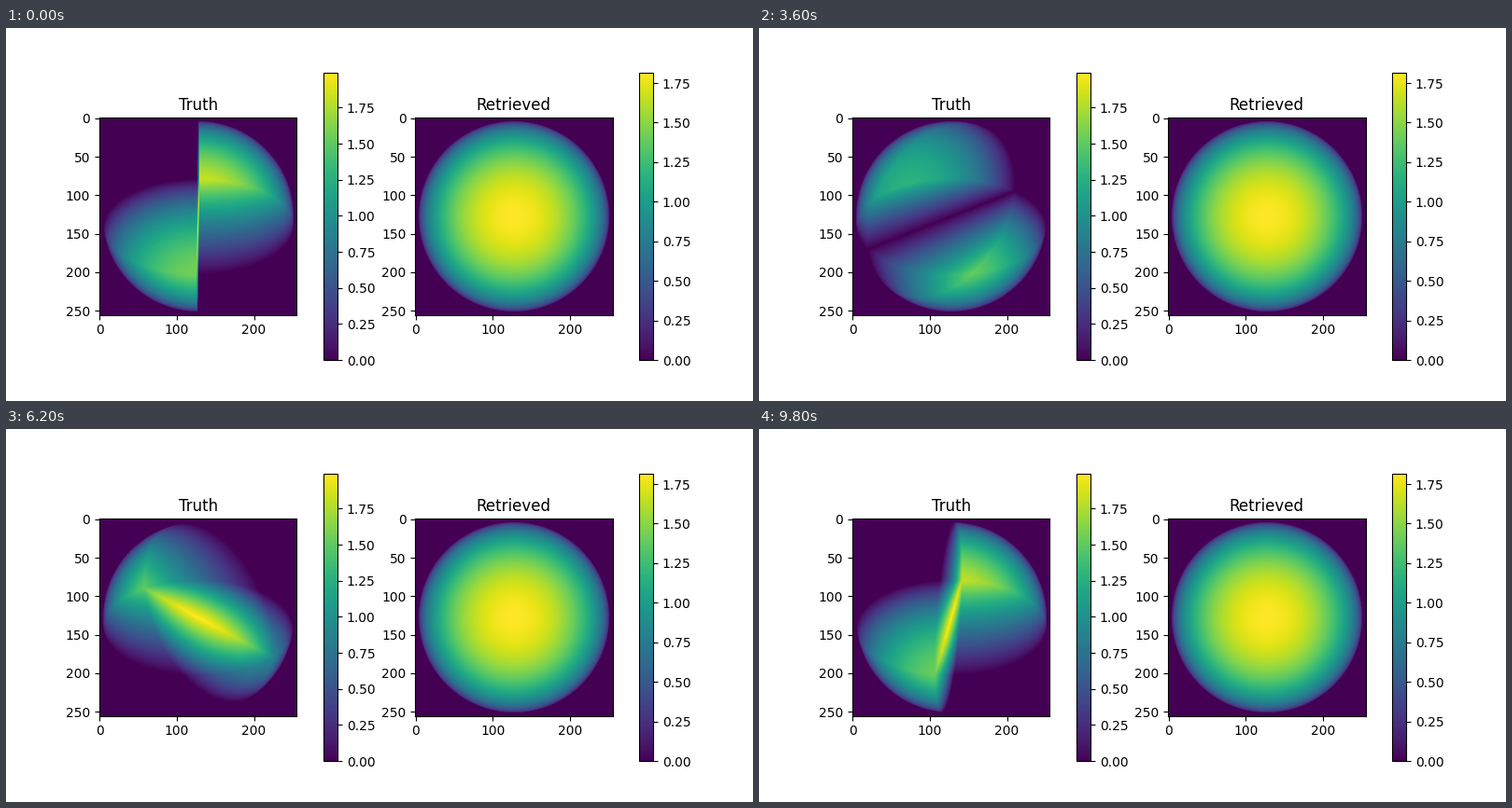
Animation, 800 px wide and 400 px high, one loop 10 s. Source, as a matplotlib script:

```python
import numpy as np
import matplotlib.pyplot as plt
from matplotlib.animation import FuncAnimation

SIZE = 256
FRAMES = 50
DIST = 4.0                      # camera distance in ball radii
TILT = np.radians(29.5)         # camera elevation
FOV = np.radians(30)
OFFSET = np.radians(0.8)        # starting angle of the cut plane
TRUTH_MAX, FIT_MAX = 1.992, 1.815

# Pinhole rays: u to the right, v towards the camera, z up.
s, c = np.sin(TILT), np.cos(TILT)
axis = (np.arange(SIZE) - (SIZE - 1) / 2) / (SIZE / 2) * np.tan(FOV / 2)
px, py = np.meshgrid(axis, -axis)
norm = np.sqrt(1 + px**2 + py**2)
du, dv, dz = px / norm, (-c - s * py) / norm, (-s + c * py) / norm
cam_v, cam_z = DIST * c, DIST * s

# Entry and exit distances through the unit ball.
mid = -(cam_v * dv + cam_z * dz)
half = np.sqrt(np.clip(1 - DIST**2 + mid**2, 0, None))
enter, leave = mid - half, mid + half


def crossing(pos, step):
    """Distance to a plane, kept inside the ball."""
    step = np.where(np.abs(step) < 1e-9, 1e-9, step)
    return np.clip(-pos / step, enter, leave)


def truth(i):
    """Path length through two opposite quarter balls."""
    t = 2 * np.pi * i / FRAMES - OFFSET
    cam_y = -cam_v * np.sin(t)
    dy = du * np.cos(t) - dv * np.sin(t)
    a, b = crossing(cam_y, dy), crossing(cam_z, dz)
    cuts = [enter, np.minimum(a, b), np.maximum(a, b), leave]
    total = np.zeros((SIZE, SIZE))
    for p, q in zip(cuts, cuts[1:]):
        m = (p + q) / 2
        filled = (cam_y + m * dy) * (cam_z + m * dz) > 0
        total += np.where(filled, q - p, 0)
    return total


def panel(ax, data, vmax, title):
    im = ax.imshow(data, cmap="viridis", vmin=0, vmax=vmax)
    ax.set_title(title)
    fig.colorbar(im, ax=ax, pad=0.1)
    return im


fig, (left, right) = plt.subplots(1, 2, figsize=(8, 4), dpi=100)
image = panel(left, truth(0), TRUTH_MAX, "Truth")
panel(right, half * FIT_MAX, FIT_MAX, "Retrieved")


def update(i):
    image.set_data(truth(i))
    return [image]


anim = FuncAnimation(fig, update, frames=FRAMES, interval=200,
                     repeat=True, repeat_delay=0)
plt.show()
```
